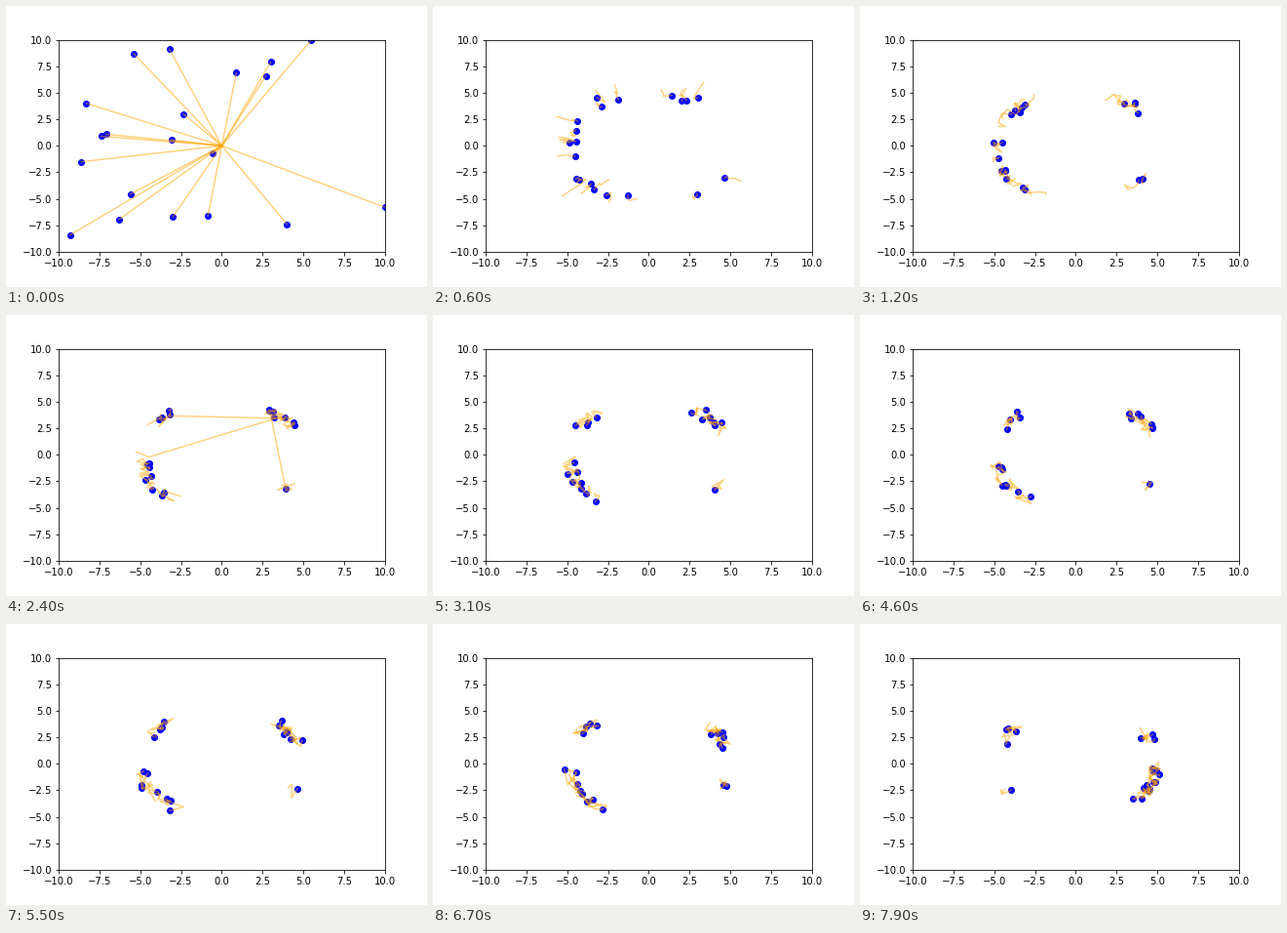
Recreate the animation shown at these times as a matplotlib script. Size 432 by 288 pixels, loop 8 s.

```python
import matplotlib.pyplot as plt
import numpy as np
from matplotlib.animation import FuncAnimation

FRAMES, TRAIL, SETTLE = 80, 5, 12
rng = np.random.default_rng(7)

# Scattered start, ordered by angle around the origin
start = np.array([
    (5.5, 10), (2.7, 6.6), (3, 7.9), (.9, 6.9), (-3.2, 9.1),
    (-5.4, 8.7), (-2.35, 3), (-8.3, 4), (-3.1, .55), (-7.1, 1.1),
    (-7.4, .9), (-8.6, -1.5), (-5.6, -4.55), (-9.3, -8.4), (-6.3, -6.95),
    (-.55, -.72), (-3, -6.7), (-.85, -6.6), (4, -7.4), (10, -5.8)])
COUNT = len(start)

# Crowds on the ring: size, first and last bearing, gap between members
CROWDS = [(4, 50, 28, 4), (5, 137, 141, 4), (9, 207, 213, 6), (2, 318, 340, 3)]
# Hops, one member per frame: first frame, how many, from crowd, to crowd
HOPS = [(21, 1, 1, 0), (22, 1, 2, 0), (23, 1, 3, 0),
        (61, 1, 0, 3), (68, 7, 2, 3), (68, 3, 0, 3)]


def bearings():
    """Bearing of each particle: its place in the crowd it belongs to."""
    ends = np.cumsum([c[0] for c in CROWDS])[:-1]
    crowds = [list(g) for g in np.split(np.arange(COUNT), ends)]
    out = np.zeros((FRAMES, COUNT))
    for t in range(FRAMES):
        for first, number, a, b in HOPS:
            if first <= t < first + number:
                crowds[b].insert(len(crowds[b]) // 2, crowds[a].pop(0))
        for members, (_, lo, hi, gap) in zip(crowds, CROWDS):
            mid = lo + (hi - lo) * t / FRAMES
            rank = np.arange(len(members)) - (len(members) - 1) / 2
            out[t, members] = mid + gap * rank
    return out


def paths():
    t = np.arange(FRAMES)[:, None]
    moving = t > 0
    deg = bearings() + rng.normal(0, 4, (FRAMES, COUNT)) * moving
    away = np.degrees(np.arctan2(start[:, 1], start[:, 0])) - deg
    away = (away + 180) % 360 - 180
    deg += away * (1 - np.clip(t / SETTLE, 0, 1) ** 2)

    # The ring is a little wider on the diagonals
    a = np.radians(deg)
    ring = 4.8 + .3 * np.abs(np.sin(2 * a))
    ring += rng.uniform(-.42, .42, ring.shape) * moving
    rad = ring + (np.hypot(*start.T) - ring) * .5 ** t
    xy = np.stack([rad * np.cos(a), rad * np.sin(a)], axis=-1)
    return np.clip(xy, -10, 10)


# Trails begin as a pile of points at the origin
history = np.concatenate([np.zeros((TRAIL - 1, COUNT, 2)), paths()])

fig, ax = plt.subplots(figsize=(6, 4), dpi=72)
fig.subplots_adjust(left=.125, right=.9, bottom=.125, top=.88)
ax.set_xlim(-10, 10)
ax.set_ylim(-10, 10)
dots = ax.scatter(*start.T, c="blue")
trails = [ax.plot([], [], color="orange", alpha=.5)[0] for _ in range(COUNT)]


def update(i):
    part = history[i:i + TRAIL]
    dots.set_offsets(part[-1])
    for k, line in enumerate(trails):
        line.set_data(part[:, k, 0], part[:, k, 1])
    return [dots, *trails]


anim = FuncAnimation(fig, update, frames=FRAMES, interval=100,
                     repeat=True, repeat_delay=0, blit=False)
plt.show()
```
